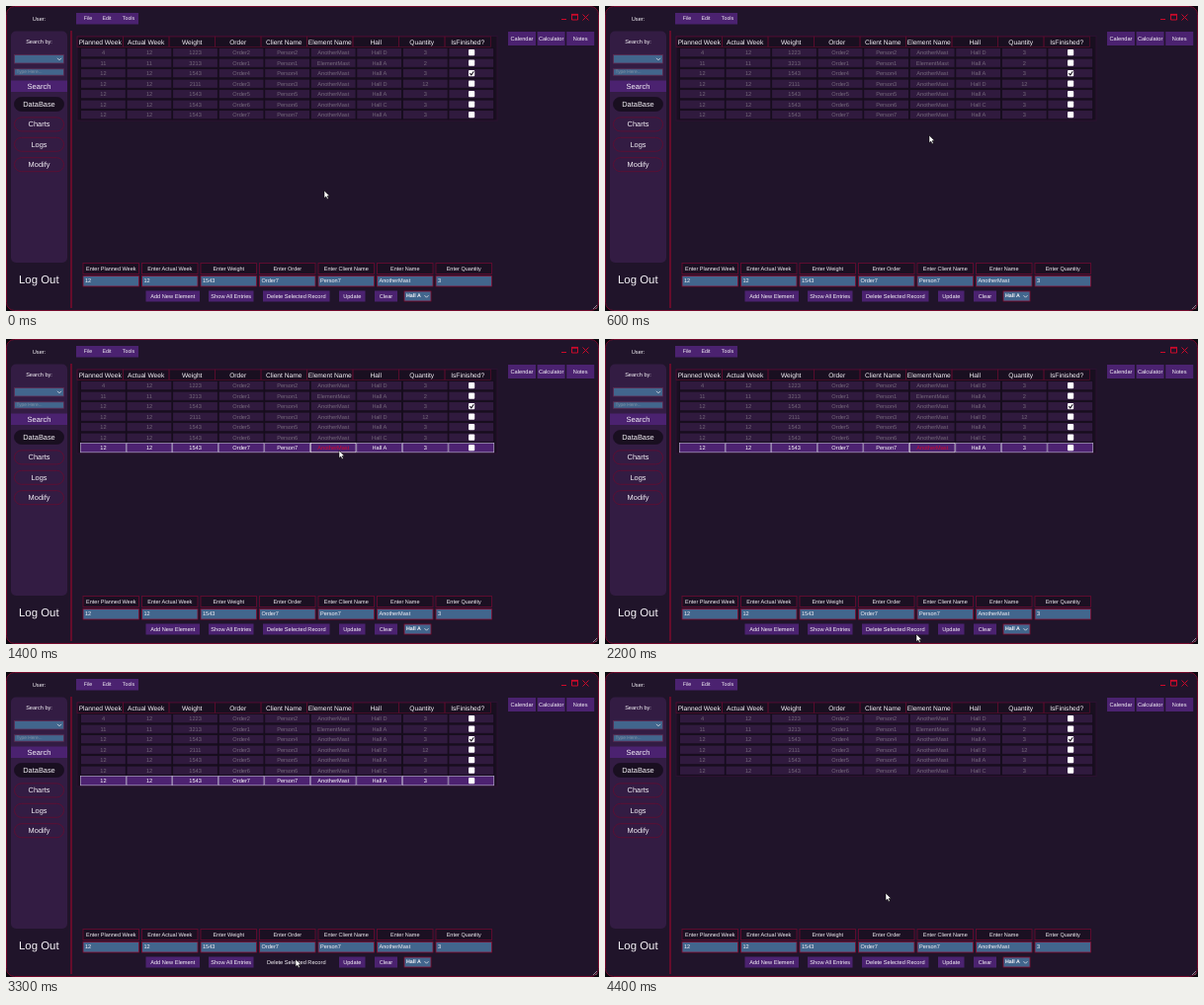
An HTML page that plays this animation: 600x309 px, repeating every 4800 ms.

```html
<!DOCTYPE html>
<html lang="en">
<head>
<meta charset="utf-8">
<title>Order database</title>
<style>
  html, body { margin: 0; width: 100%; height: 100%; overflow: hidden; background: #0b070e; }
  svg { display: block; }
  text {
    font-family: "Liberation Sans", Arial, sans-serif;
    text-rendering: geometricPrecision;
  }
  .selected text { fill: #fff; }
  .selected g rect { fill: #4d2271; stroke: #b7a6cf; stroke-width: 0.7px; }
  .selected .focus text { fill: #d0082f; }
  .selected .focus rect { stroke: #f0eaf5; }
</style>
</head>
<body>
<svg id="stage" width="600" height="309" viewBox="0 0 600 309"></svg>
<script>
const LOOP = 4800, STEP = 100;
const RED = '#860a2e', DARK_RED = '#650c30', PURPLE = '#4b2270', BLUE = '#42668d';
const stage = document.getElementById('stage');

function add(tag, attrs, parent = stage) {
  const node = document.createElementNS('http://www.w3.org/2000/svg', tag);
  for (const key in attrs) node.setAttribute(key, attrs[key]);
  return parent.appendChild(node);
}

const box = (x, y, width, height, fill, extra, parent) =>
  add('rect', { x, y, width, height, fill, ...extra }, parent);

const line = (d, stroke, width = 1) =>
  add('path', { d, stroke, 'stroke-width': width, fill: 'none' });

// y is the middle of the capital letters
function label(str, x, y, size, extra, parent) {
  const attrs = { x, y: y + size * 0.34, 'font-size': size, 'text-anchor': 'middle', fill: '#f6f3f8', ...extra };
  add('text', attrs, parent).textContent = str;
}

const outline = (stroke, width = 1) => ({ stroke, 'stroke-width': width });

function button(str, x, y, width, height, size = 5.65) {
  const face = box(x, y, width, height, PURPLE);
  label(str, x + width / 2, y + height / 2, size);
  return face;
}

function field(x, y, width, height, str, border = RED, extra) {
  box(x, y, width, height, BLUE, outline(border, 0.8));
  label(str, x + 2, y + height / 2 - 0.6, 5.6, { 'text-anchor': 'start', ...extra });
}

const chevron = (x, y) => line(`M${x - 2} ${y - 1}l2 2 2-2`, '#d5d8e2', 0.9);

function drawWindow() {
  box(0.5, 0.5, 599, 308, '#20142a', { rx: 8, ...outline('#750a2c') });
  line('M66 25V306', '#7d0a2c', 1.5);
  label('User:', 33.5, 13.2, 5.7);
  box(71, 7, 63, 11.5, PURPLE);
  label('File', 83, 12.5, 5.3);
  label('Edit', 102, 12.5, 5.3);
  label('Tools', 124, 12.5, 5.3);
  line('M562 13.5h5M572.5 8.5v5.5h6v-5.5M583.5 8.5l6 6M589.5 8.5l-6 6', '#cc0a2a');
  line('M572 8.8h7', '#cc0a2a', 1.8);
  line('M594 307l4-4M596.5 307l1.5-1.5', '#a9a3ad', 0.8);
  ['Calendar', 'Calculator', 'Notes'].forEach((str, i) => button(str, 508 + i * 29.6, 26, 28, 14));
}

function drawSidebar() {
  box(5, 25.5, 57, 234.5, '#331c43', { rx: 5 });
  label('Search by:', 33.5, 36.5, 5.6);
  field(8.5, 49.5, 50, 8.5, '', '#5c2a50');
  chevron(54, 53.8);
  field(8.5, 63.8, 50, 6.4, 'Type Here...', '#5c2a50', { fill: '#8290a4', 'font-size': 4.8 });
  button('Search', 5, 75.5, 57, 11.5, 7.5);
  ['DataBase', 'Charts', 'Logs', 'Modify'].forEach((str, i) => {
    const y = 99.5 + i * 20.4;
    box(8.5, y - 7, 50, 14, i ? '#331c43' : '#190f20', { rx: 7, ...outline(i ? DARK_RED : '#190f20', 0.8) });
    label(str, 33.5, y, 7.4);
  });
  label('Log Out', 33.3, 277.2, 11.4);
}

const headers = ['Planned Week', 'Actual Week', 'Weight', 'Order', 'Client Name',
  'Element Name', 'Hall', 'Quantity', 'IsFinished?'];
const records = [
  '4 12 1223 2 D 3', '11 11 3213 1 A 2', '12 12 1543 4 A 3', '12 12 2111 3 D 12',
  '12 12 1543 5 A 3', '12 12 1543 6 C 3', '12 12 1543 7 A 3'
];

function drawRow(record, index) {
  const [planned, actual, weight, id, hall, quantity] = record.split(' ');
  const element = id === '1' ? 'ElementMast' : 'AnotherMast';
  const values = [planned, actual, weight, 'Order' + id, 'Person' + id, element, 'Hall ' + hall, quantity, ''];
  const row = add('g', {}), y = 47.2 + index * 10.5;
  const cells = values.map((value, i) => {
    const cell = add('g', {}, row), x = 75.5 + i * 46.55;
    box(x, y - 4.6, 45.8, 9.2, '#301a3e', outline('#160d1c', 0.9), cell);
    label(value, x + 23, y + 0.3, 5.65, { fill: '#74687a' }, cell);
    return cell;
  });
  box(468, y - 3.2, 6.2, 6.2, '#fff', { rx: 1 }, row);
  if (id === '4') line(`M469.3 ${y}l1.5 1.6 2.5-3.6`, '#17101c', 1.1);
  return { row, element: cells[5] };
}

function drawTable() {
  const frame = box(72, 30.5, 425, 85.5, '#190f20', outline('#2c1030'));
  headers.forEach((str, i) => {
    const x = 72 + i * 46.5;
    box(x, 31, 46.5, 10.5, 'none', outline(DARK_RED, 0.6));
    label(str, x + 23.2, 36.6, 6.65);
  });
  return { frame, last: records.map(drawRow).pop() };
}

function drawForm() {
  const names = ['Planned Week', 'Actual Week', 'Weight', 'Order', 'Client Name', 'Name', 'Quantity'];
  const values = ['12', '12', '1543', 'Order7', 'Person7', 'AnotherMast', '3'];
  names.forEach((name, i) => {
    const x = 78 + i * 59.5;
    box(x, 260.5, 56.5, 11, '#1b1022', outline(DARK_RED, 0.9));
    label('Enter ' + name, x + 28.3, 266, 5.5);
    field(x, 273.5, 56.5, 10.5, values[i]);
  });
  button('Add New Element', 141.5, 288.5, 54.5, 11);
  button('Show All Entries', 205, 288.5, 45.5, 11);
  const remove = button('Delete Selected Record', 260, 288.5, 67.5, 11);
  button('Update', 337, 288.5, 26.5, 11);
  button('Clear', 373, 288.5, 23, 11);
  field(403, 289, 27, 10, 'Hall A', RED, { 'font-weight': 'bold', 'font-size': 5.3 });
  chevron(425.5, 294.2);
  return remove;
}

drawWindow();
drawSidebar();
const { frame, last } = drawTable();
const removeButton = drawForm();
const cursor = add('path', {
  d: 'M0 0V7.6L1.8 6 3 8.7 4.3 8.1 3.1 5.5H5.5Z',
  fill: '#fff', stroke: '#000', 'stroke-width': 0.5
});

// time, x, y of the pointer tip
const path = [
  [0, 322, 187], [600, 328, 131], [1000, 337, 113], [2100, 337, 113], [2200, 315, 299],
  [2600, 293, 291], [3300, 293, 291], [3400, 288, 248], [3600, 284, 224], [LOOP, 284, 224]
];

function pointerAt(t) {
  const next = path.findIndex(key => key[0] > t);
  const [t0, x0, y0] = path[next - 1], [t1, x1, y1] = path[next];
  const k = (t - t0) / (t1 - t0);
  return [x0 + (x1 - x0) * k, y0 + (y1 - y0) * k];
}

function render(now) {
  const t = Math.floor(now % LOOP / STEP) * STEP;
  const deleted = t >= 3400;
  cursor.setAttribute('transform', `translate(${pointerAt(t)})`);
  last.row.setAttribute('class', t >= 1400 ? 'selected' : '');
  last.row.setAttribute('visibility', deleted ? 'hidden' : 'visible');
  last.element.setAttribute('class', t < 3100 ? 'focus' : '');
  frame.setAttribute('height', deleted ? 75 : 85.5);
  removeButton.setAttribute('visibility', t >= 2300 && !deleted ? 'hidden' : 'visible');
}

const start = performance.now();
(function tick() {
  render(performance.now() - start);
  requestAnimationFrame(tick);
})();
</script>
</body>
</html>
```
